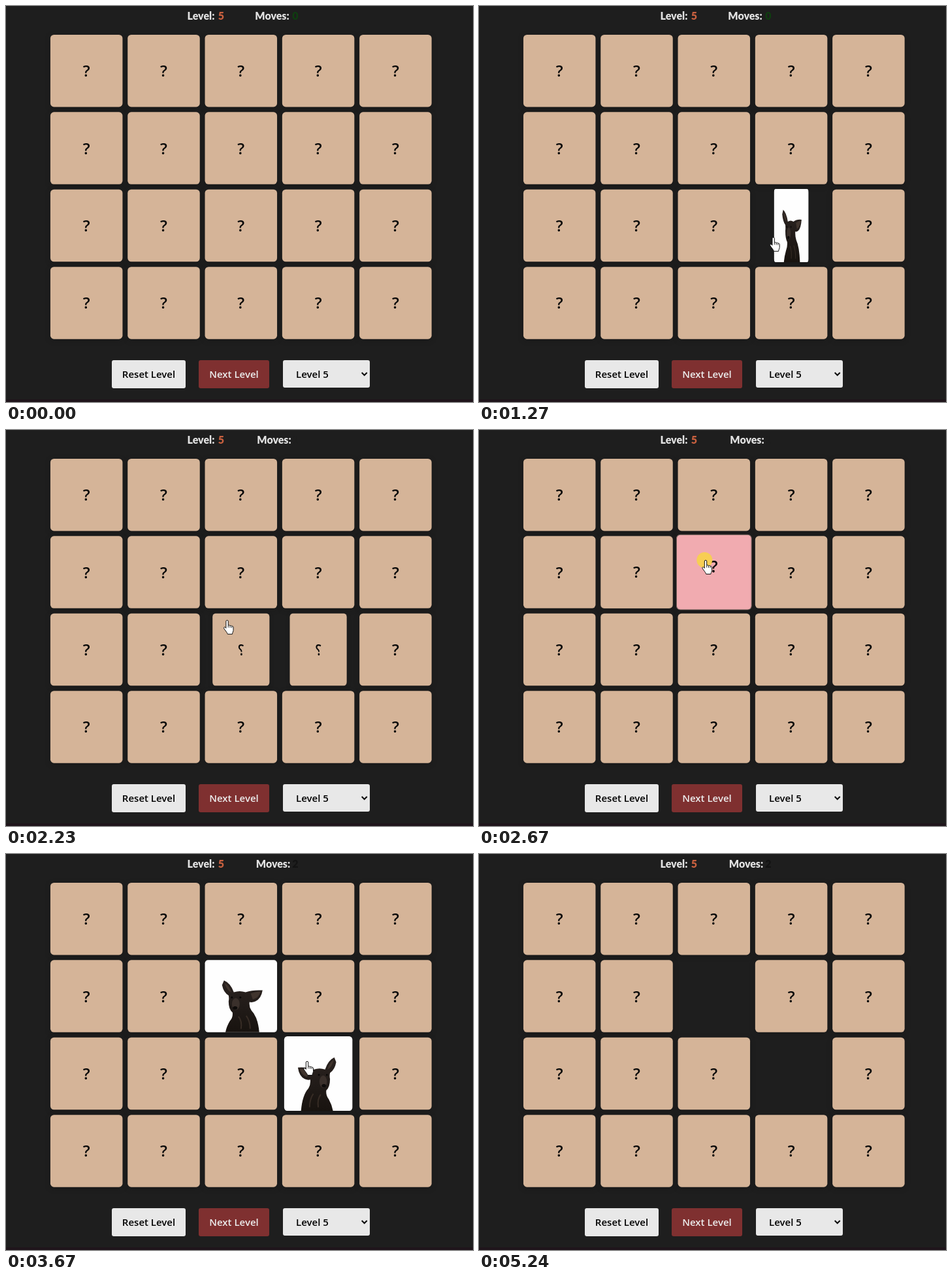
An HTML page for the animation above (5980 ms loop, 715 px wide and 606 px high).

```html
<!DOCTYPE html>
<html lang="en">
<head>
<meta charset="utf-8">
<title>Memory cards</title>
<style>
  html, body { margin: 0; width: 100%; height: 100%; overflow: hidden; background: #1e1e1e; }
  svg { display: block; width: 100%; height: 100%; }
  text { text-anchor: middle; font: 600 15px "Open Sans", "Noto Sans", sans-serif; }
  .head { font: 900 16px Lato, sans-serif; fill: #e2e2e2; }
  .mark { font-size: 24px; fill: #080808; }
  .card { filter: drop-shadow(0 2px 4px rgba(0, 0, 0, .2)); }
</style>
</head>
<body>
<svg viewBox="0 0 715 606">
  <defs>
    <clipPath id="round"><rect x="-55.25" y="-55.25" width="110.5" height="110.5" rx="5"/></clipPath>
    <filter id="soft"><feGaussianBlur stdDeviation="3"/></filter>
    <linearGradient id="snow" x2="0" y2="1">
      <stop offset="0" stop-color="#252b2b"/>
      <stop offset=".4" stop-color="#3c4043"/>
      <stop offset=".58" stop-color="#858994"/>
      <stop offset=".84" stop-color="#a2a4ac"/>
      <stop offset=".95" stop-color="#dddbda"/>
    </linearGradient>
    <linearGradient id="coat" x2="0" y2="1">
      <stop offset="0" stop-color="#2b2320"/>
      <stop offset=".5" stop-color="#211b18"/>
      <stop offset="1" stop-color="#18130f"/>
    </linearGradient>

    <g id="dog" clip-path="url(#round)">
      <rect x="-56" y="-56" width="112" height="112" fill="#fefefe"/>
      <path fill="url(#coat)" d="M-26-24Q-16-20-11-6Q-2-9 7-6Q18-10 33-9Q31 4 22 8Q17 10 13 9Q12 16 16 22Q26 32 28 56H-24Q-22 46-17 38Q-12 32-13 25Q-19 20-19 8Q-18 4-19-1Q-27-6-29-17Z"/>
      <path fill="#40342d" d="M-25-20Q-18-16-15-6Q-22-9-25-20ZM15-4Q24-7 30-7Q27 3 18 5Z"/>
      <ellipse cx="-8" cy="12" rx="6" ry="9" fill="#3a302b"/>
      <ellipse cx="-9" cy="18" rx="3.5" ry="2.5" fill="#0d0b0a"/>
      <circle cx="-14" cy="2" r="1.5" fill="#080706"/>
      <circle cx="-1" cy="2" r="1.5" fill="#080706"/>
      <path fill="none" stroke="#372c25" stroke-width="2" d="M-4 31Q2 38 0 50M8 30Q14 38 14 50"/>
    </g>

    <g id="fox" clip-path="url(#round)">
      <rect x="-56" y="-56" width="112" height="112" fill="url(#snow)"/>
      <path fill="#b5702f" d="M-28 8Q-39 28-40 56H37Q38 28 28 8Z"/>
      <path fill="#cbbdb1" d="M-20 8Q-22 36-12 56H14Q22 36 20 8Z"/>
      <path fill="#c97c30" d="M-39-47Q-26-44-16-28Q-2-32 13-28Q24-43 37-45Q41-34 37-21Q43-8 39 3Q28 16 12 21H-12Q-30 16-41 2Q-44-10-38-23Q-42-34-39-47Z"/>
      <path fill="#dcc0a5" d="M-36-42Q-26-38-22-26L-33-20Q-37-30-36-42ZM34-40Q24-36 20-26L32-19Q36-28 34-40Z"/>
      <path fill="#6b4630" d="M-35-36L-27-25-33-21ZM33-34L25-25 31-20Z"/>
      <path fill="#e9dfd4" d="M-35 5Q-18 8-9-2L0 6 9-2Q18 8 34 5Q22 24 0 24Q-22 24-35 5Z"/>
      <path fill="#d89145" d="M-7-20H7L6 3Q0 8-6 3Z"/>
      <ellipse cx="-14" cy="-9" rx="4.5" ry="3" fill="#2a1a10"/>
      <ellipse cx="12" cy="-9" rx="4.5" ry="3" fill="#2a1a10"/>
      <ellipse cx="-1" cy="9" rx="5.5" ry="4" fill="#12100f"/>
      <path fill="none" stroke="#54433a" stroke-width="1.5" d="M-8 16Q-1 20 6 16"/>
      <ellipse cx="0" cy="55" rx="58" ry="9" fill="#e2dfdd" filter="url(#soft)"/>
    </g>
  </defs>

  <rect width="715" height="606" fill="#1e1e1e"/>
  <rect y="602" width="715" height="4" fill="#1f151b"/>
  <text class="head" x="298.5" y="21">Level:</text>
  <text class="head" x="329.5" y="21" style="fill:#c8603f">5</text>
  <text class="head" id="label" y="21">Moves:</text>
  <text class="head" id="moves" x="443" y="21"></text>
  <g id="board"></g>

  <rect x="162" y="542" width="113" height="43" rx="3" fill="#e8e8e8"/>
  <text x="218.5" y="569">Reset Level</text>
  <rect x="295" y="542" width="108" height="43" rx="3" fill="#7f3030"/>
  <text x="349" y="569" fill="#ececec">Next Level</text>
  <rect x="424" y="542" width="133" height="42" rx="3" fill="#e8e8e8"/>
  <text x="469" y="569">Level 5</text>
  <path d="M544.7 561l4 4 4-4" fill="none" stroke="#0a0a0a" stroke-width="2"/>

  <g id="cursor">
    <circle id="press" cx="4" cy="0" r="12" fill="#f7d04c" opacity=".92"/>
    <path fill="#fff" stroke="#111" stroke-linejoin="round" d="M4 2a1.7 1.7 0 0 1 3.4 0v6.5c.5-1 2.6-.8 2.8.4.6-.8 2.4-.6 2.6.6.8-.6 2.4 0 2.4 1.5v4.5c0 2-1.4 3.5-1.6 6H6.4C6 19 2.2 15.5.8 12.7c-.8-1.6 1-2.6 2.2-1.4L4 12.4z"/>
    <path fill="none" stroke="#111" stroke-width=".9" d="M7.4 8.5v3M10.2 9v2.8M12.8 9.6v2.4"/>
  </g>
</svg>
<script>
const LOOP = 5980, FLIP = 500, HOVER = 250, PRESS = 100, CLEAR = 4510;
const TAN = [213, 180, 152], PINK = [242, 171, 177];
const NS = 'http://www.w3.org/2000/svg';
const $ = id => document.getElementById(id);

// Pointer tip: time, x, y
const path = [
  [340, 658, 606], [560, 570, 505], [740, 510, 430], [900, 478, 372],
  [1180, 476, 368], [1270, 451, 354], [1480, 380, 317], [2180, 380, 317],
  [2340, 250, 235], [2420, 252, 230], [2540, 347, 199], [3230, 347, 199],
  [3380, 385, 290], [3500, 461, 317], [5000, 461, 317], [5060, 466, 390],
  [5180, 480, 610]
];
const clicks = [1080, 1580, 2690, 3610];

// Per "column,row": hover spans, face-up spans, picture, removal when matched
const acts = {
  '4,3': { hover: [[550, 647]] },
  '3,3': { hover: [[671, 825], [5065, 5125]] },
  '1,1': { hover: [[2283, 2476]] },
  '3,2': { hover: [[848, 1080], [3441, 3610]], open: [[1080, 2150], [3610, LOOP]], face: 'dog', matched: true },
  '2,2': { hover: [[1373, 1580], [3365, 3428]], open: [[1580, 2150]], face: 'fox' },
  '2,1': { hover: [[2486, 2690]], open: [[2690, LOOP]], face: 'dog', matched: true }
};

// cubic-bezier(.25, .1, .25, 1)
function ease(x) {
  if (x <= 0) return 0;
  if (x >= 1) return 1;
  const bez = (u, a, b) => 3 * u * (1 - u) * (1 - u) * a + 3 * u * u * (1 - u) * b + u * u * u;
  let lo = 0, hi = 1;
  for (let i = 0; i < 24; i++) {
    const mid = (lo + hi) / 2;
    if (bez(mid, .25, .25) < x) lo = mid; else hi = mid;
  }
  return bez(lo, .1, 1);
}

function add(parent, tag, attrs, text) {
  const el = document.createElementNS(NS, tag);
  for (const k in attrs) el.setAttribute(k, attrs[k]);
  if (text) el.textContent = text;
  parent.appendChild(el);
  return el;
}

function makeCard(col, row) {
  const act = acts[col + ',' + row] || {};
  const x = 123.2 + 118.3 * col, y = 99.2 + 118.4 * row;
  const root = add($('board'), 'g', { class: 'card' });
  const front = add(root, 'g', {});
  const back = add(front, 'rect', { x: -55.25, y: -55.25, width: 110.5, height: 110.5, rx: 5.5, stroke: '#74645c' });
  const mark = add(front, 'text', { class: 'mark' }, '?');
  const image = act.face && add(root, 'use', { href: '#' + act.face, transform: 'scale(-1 1)' });
  return { ...act, x, y, root, front, back, mark, image };
}

function hoverAt(spans, t) {
  let level = 0;
  for (const [from, to] of spans || []) {
    if (t < from) continue;
    const peak = ease((Math.min(t, to) - from) / HOVER);
    level = t <= to ? peak : peak * (1 - ease((t - to) / (HOVER * peak)));
  }
  return level;
}

function drawCard(card, t) {
  let turn = 0, up = false, hover = hoverAt(card.hover, t), lift = hover;
  for (const [from, to] of card.open || []) {
    if (t < from) continue;
    up = t < to;
    turn = up ? ease((t - from) / FLIP) : 1 - ease((t - to) / FLIP);
    if (up) lift = hoverAt(card.hover, from) * (1 - turn);
  }
  const size = 1 + .04 * lift;
  const wide = size * Math.cos(Math.PI * turn);
  card.root.setAttribute('transform', `translate(${card.x} ${card.y}) scale(${wide} ${size})`);
  card.root.style.display = card.matched && t >= CLEAR ? 'none' : '';
  card.front.style.display = up ? 'none' : '';
  if (card.image) card.image.style.display = up ? '' : 'none';
  const rgb = TAN.map((v, i) => Math.round(v + (PINK[i] - v) * hover));
  card.back.setAttribute('fill', `rgb(${rgb})`);
  card.back.setAttribute('stroke-opacity', Math.min(1, hover * 10));
  card.mark.setAttribute('y', 9 - 9 * hover);
}

function drawCursor(t) {
  const i = path.findIndex(p => p[0] > t);
  $('cursor').style.display = i > 0 ? '' : 'none';
  if (i < 1) return;
  const [t0, x0, y0] = path[i - 1], [t1, x1, y1] = path[i];
  const k = (t - t0) / (t1 - t0);
  $('cursor').setAttribute('transform', `translate(${x0 + (x1 - x0) * k - 5.7} ${y0 + (y1 - y0) * k})`);
  $('press').style.display = clicks.some(c => t >= c - PRESS && t < c) ? '' : 'none';
}

function drawMoves(t) {
  const n = t < clicks[1] ? 0 : t < clicks[3] ? 1 : 2;
  $('label').setAttribute('x', [407.5, 410.5, 409][n]);
  $('moves').textContent = n;
  $('moves').style.fill = ['#0f3d10', '#1e1e1e', '#131313'][n];
}

const cards = [];
for (let row = 0; row < 4; row++)
  for (let col = 0; col < 5; col++) cards.push(makeCard(col, row));

function draw(t) {
  cards.forEach(card => drawCard(card, t));
  drawMoves(t);
  drawCursor(t);
}

const start = performance.now();
function tick() {
  draw((performance.now() - start) % LOOP);
  requestAnimationFrame(tick);
}
tick();
</script>
</body>
</html>
```
